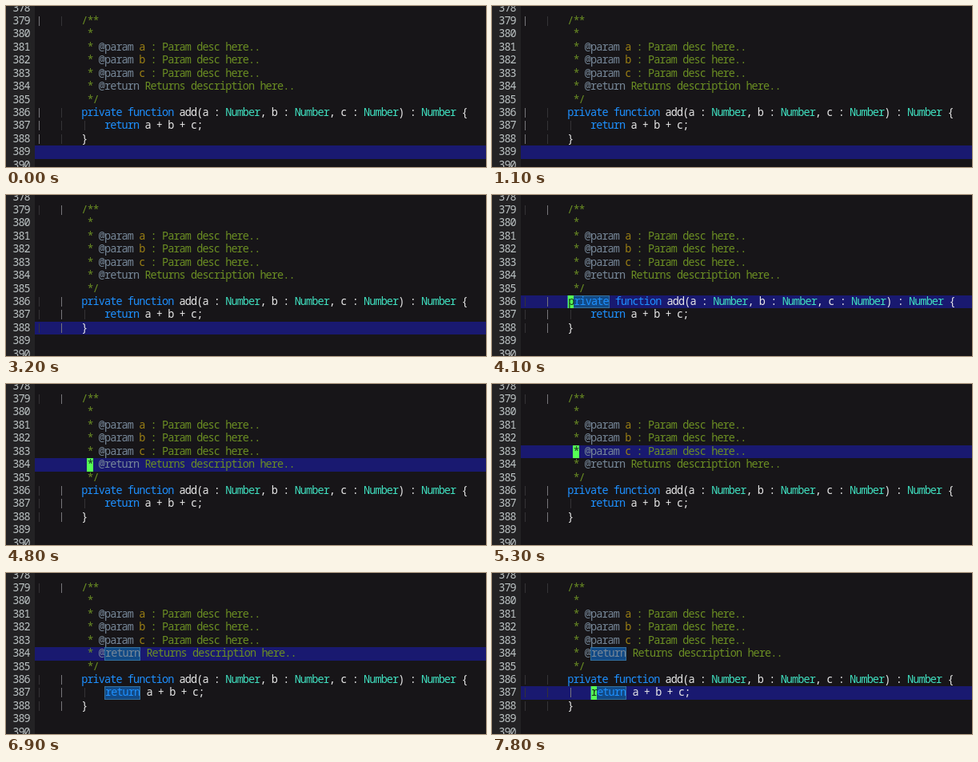
Write an HTML page that moves like this. It is 600 by 202 pixels and loops after 8000 ms.

```html
<!DOCTYPE html>
<html lang="en">
<head>
<meta charset="utf-8">
<title>Code editor</title>
<style>
  html, body { margin: 0; width: 100%; height: 100%; overflow: hidden; background: #171518; }
  #stage { position: relative; width: 600px; height: 202px; overflow: hidden;
    font: 13.5px/15px "Noto Sans Mono", "DejaVu Sans Mono", monospace;
    letter-spacing: -.9px; white-space: pre; color: #e8e8e8; }
  #gutter { position: absolute; left: 0; top: 0; width: 36px; height: 202px; background: #232224; }
  .num { position: absolute; left: 8.2px; color: #bcc3c4; }
  .row { position: absolute; left: 36px; right: 0; padding-left: .6px; }
  .row.on { background: #191970; }
  .guide { position: absolute; top: 2px; width: 1px; height: 12px; background: #343336; }
  .guide.lit { background: #77767a; }
  .doc { color: #6b8e23; }
  .tag { color: #778899; }
  .arg { color: #9a7f14; }
  .key { color: #1e90ff; }
  .type { color: #40e0c0; }
  .sym, .cursor { display: inline-block; height: 100%; box-sizing: border-box; vertical-align: top; }
  .sym { border: solid #33709f; border-width: 0 1px; background: #124a86;
    box-shadow: inset 0 1px #33709f, inset 0 -1px #33709f; }
  .cursor { background: #55ff55; color: #17301a; }
</style>
</head>
<body>
<div id="stage"><div id="gutter"></div></div>
<script>
const FIRST = 378, LAST = 390, PITCH = 16.43, ADVANCE = 7.2;
const LOOP = 8000, BLINK = 500, MARK_DELAY = 200;
const stage = document.getElementById('stage');
const rowTop = n => Math.round((n - FIRST) * PITCH - 5.4);

const source = `
        /**
         *
         * @param a : Param desc here..
         * @param b : Param desc here..
         * @param c : Param desc here..
         * @return Returns description here..
         */
        private function add(a : Number, b : Number, c : Number) : Number {
            return a + b + c;
        }

`.split('\n');
const lineText = n => source[n - FIRST];
const indent = n => lineText(n).search(/\S|$/);

// Bursts of keys: start, gap, vi-style moves
const bursts = [
  [2000, 500, 'k^'], [3300, 400, 'kk'], [4400, 200, 'klkk'],
  [5900, 140, 'jlll'], [7100, 200, 'jjj']
];

function cursorAt(t) {
  const cur = { line: 389, col: 0, moved: -700 };
  const moves = {
    k: () => cur.line--,
    j: () => cur.line++,
    l: () => cur.col++,
    '^': () => cur.col = indent(cur.line)
  };
  for (const [start, gap, keys] of bursts)
    [...keys].forEach((key, i) => {
      const at = start + i * gap;
      if (at > t) return;
      moves[key]();
      cur.moved = at;
    });
  const idle = t - cur.moved;
  return {
    line: cur.line,
    col: Math.min(cur.col, lineText(cur.line).length),
    shown: Math.floor(idle / BLINK) % 2 === 0,
    marking: idle >= MARK_DELAY
  };
}

function tokens(n) {
  const text = lineText(n), comment = /^\s*[/*]/.test(text);
  const kind = word => comment
    ? (/^\w$/.test(word) ? 'arg' : 'tag')
    : (word === 'Number' ? 'type' : 'key');
  let at = 0;
  return text.split(/(@|(?<=@)\w+|(?<=@param )\w|\b(?:private|function|return|Number)\b)/)
    .map((word, i) => {
      const cls = i % 2 ? kind(word) : comment ? 'doc' : '';
      const token = { word, cls, at, symbol: i % 2 && word.length > 1 };
      at += word.length;
      return token;
    });
}

function wordUnder({ line, col, marking }) {
  const hit = tokens(line).find(k => k.symbol && col >= k.at && col < k.at + k.word.length);
  return marking && hit ? hit.word : null;
}

const span = (cls, text) => text && `<span class="${cls}">${text}</span>`;

function guidesHtml(n, line) {
  const depth = indent(n);
  if (depth % 4) return '';
  const active = Math.max(0, Math.floor(indent(line) / 4) * 4 - 4);
  let html = '';
  for (let c = 0; c < depth; c += 4)
    html += `<i class="guide${c === active ? ' lit' : ''}" style="left:${c * ADVANCE + 4.6}px"></i>`;
  return html;
}

function rowHtml(n, cur, marked) {
  const caret = cur.shown && n === cur.line ? cur.col : -1;
  let html = guidesHtml(n, cur.line);
  for (const { word, cls, at } of tokens(n)) {
    const k = caret - at;
    const body = k >= 0 && k < word.length
      ? word.slice(0, k) + span('cursor', word[k]) + word.slice(k + 1)
      : word;
    html += span(cls + (word && word === marked ? ' sym' : ''), body);
  }
  return caret === lineText(n).length ? html + span('cursor', ' ') : html;
}

function add(cls, n) {
  const el = stage.appendChild(document.createElement('div'));
  el.className = cls;
  el.style.top = rowTop(n) + 'px';
  el.style.height = rowTop(n + 1) - rowTop(n) + 'px';
  return el;
}

const rows = {};
for (let n = FIRST; n <= LAST; n++) {
  add('num', n).textContent = n;
  rows[n] = add('row', n);
}

let drawn;
function frame(now) {
  const cur = cursorAt(now % LOOP);
  const state = JSON.stringify(cur);
  if (state !== drawn) {
    drawn = state;
    const marked = wordUnder(cur);
    for (let n = FIRST; n <= LAST; n++) {
      rows[n].classList.toggle('on', n === cur.line);
      rows[n].innerHTML = rowHtml(n, cur, marked);
    }
  }
  requestAnimationFrame(frame);
}
frame(performance.now());
</script>
</body>
</html>
```
